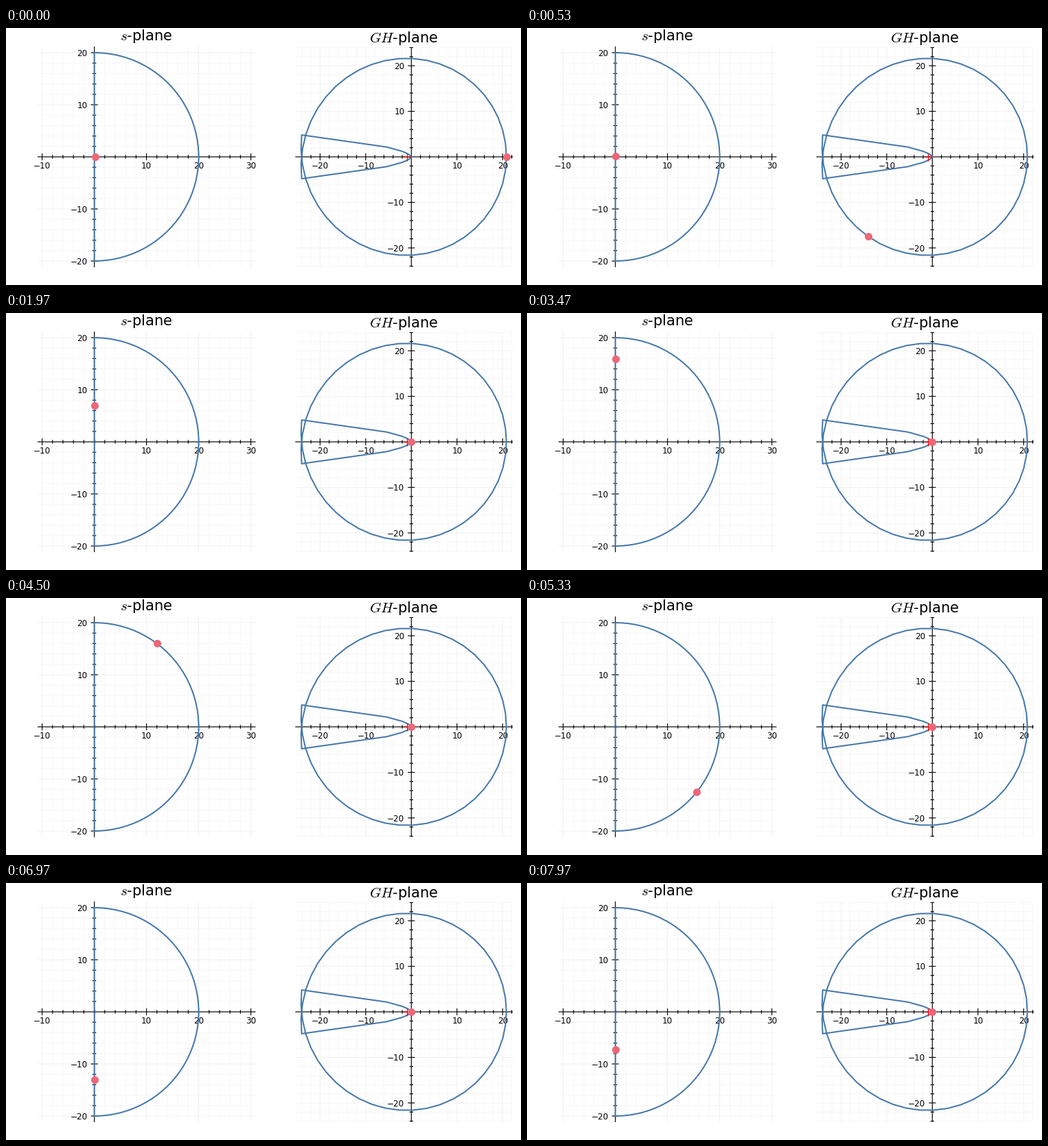
A matplotlib script that plays this animation: 750 px wide and 375 px high, repeating every 8000 ms.

```python
import numpy as np
import matplotlib.pyplot as plt
from matplotlib.animation import FuncAnimation
from matplotlib.collections import LineCollection

W, H, DPI = 750, 375, 100
PX = 72 / DPI  # points per pixel
BLUE, PINK = "#4477AA", "#EE6677"
LOOP_MS, TICK_MS = 8000, 20
POINTS_PER_S = 30
EPS, R = 0.2, 20

plt.rcParams["font.family"] = "DejaVu Sans"
plt.rcParams["mathtext.fontset"] = "cm"


def arc(radius, start, stop, n):
    return radius * np.exp(1j * np.radians(np.linspace(start, stop, n)))


def nyquist_path():
    """Contour around the right half plane, indented at the origin."""
    return np.concatenate([
        arc(EPS, 0, 90, 25),
        1j * np.linspace(EPS, R / 2, 50),
        1j * np.linspace(R / 2, R, 50),
        arc(R, 90, -90, 50),
        1j * np.linspace(-R, -R / 2, 50),
        1j * np.linspace(-R / 2, -EPS, 50),
        arc(EPS, -90, 0, 25),
    ])


def open_loop(s):
    return 1 / (s**2 * (s + 1))


class Plane:
    """Plot with axes through the origin, laid out in stage pixels."""

    def __init__(self, ax, origin, scale, box, title, title_pos):
        self.ax, self.origin, self.scale, self.box = ax, origin, scale, box
        self.draw_grid()
        self.draw_axes()
        ax.text(*title_pos, title, size=21 * PX, ha="center", va="baseline")

    def to_px(self, z):
        ox, oy = self.origin
        return ox + self.scale * np.real(z), oy - self.scale * np.imag(z)

    def ticks(self, axis):
        lo, hi = self.box[axis], self.box[axis + 2]
        for v in range(-40, 41, 2):
            p = self.origin[axis] + (v if axis == 0 else -v) * self.scale
            if lo <= p <= hi:
                yield v, p

    def lines(self, segs, color, width, z):
        self.ax.add_collection(LineCollection(
            segs, colors=color, linewidths=width * PX, zorder=z, snap=False))

    def draw_grid(self):
        x0, y0, x1, y1 = self.box
        for major, color in ((False, "#f7f7f7"), (True, "#efefef")):
            segs = [[(p, y0), (p, y1)] for v, p in self.ticks(0) if (v % 10 == 0) == major]
            segs += [[(x0, p), (x1, p)] for v, p in self.ticks(1) if (v % 10 == 0) == major]
            self.lines(segs, color, 0.9, 1)

    def draw_axes(self):
        x0, y0, x1, y1 = self.box
        ox, oy = self.origin
        segs = [[(x0, oy), (x1, oy)], [(ox, y0), (ox, y1)]]
        for axis in (0, 1):
            for v, p in self.ticks(axis):
                if v == 0:
                    continue
                d = 2.7 if v % 10 else 5
                if axis == 0:
                    segs.append([(p, oy - d), (p, oy + d)])
                else:
                    segs.append([(ox - d, p), (ox + d, p)])
                if v % 10 == 0:
                    self.label(axis, v, p)
        self.lines(segs, "black", 1.15, 2)

    def label(self, axis, v, p):
        ox, oy = self.origin
        text = str(v).replace("-", "\u2212")
        if axis == 0:
            place = dict(x=p, y=oy + 16.7, ha="center")
        else:
            place = dict(x=ox - 10, y=p + 4.6, ha="right")
        self.ax.text(s=text, size=12 * PX, va="baseline", zorder=2, **place)

    def curve(self, z):
        self.ax.plot(*self.to_px(z), color=BLUE, lw=2 * PX, zorder=3, snap=False)

    def marker(self, z, shape, size, **style):
        x, y = self.to_px(z)
        return self.ax.plot([x], [y], shape, ms=size * PX, snap=False, **style)[0]


fig = plt.figure(figsize=(W / DPI, H / DPI), dpi=DPI, facecolor="white")
ax = fig.add_axes([0, 0, 1, 1])
ax.set(xlim=(0, W), ylim=(H, 0))
ax.axis("off")

path = nyquist_path()
image = open_loop(path)

s_plane = Plane(ax, (128.6, 188), 7.6, (46, 27, 363.5, 349),
                "$s$-plane", (204.2, 18))
gh_plane = Plane(ax, (590.3, 188), 6.645, (421.3, 28, 738, 348.5),
                 "$GH$-plane", (579.6, 20.6))
s_plane.curve(path)
gh_plane.curve(image)
gh_plane.marker(-1, "+", 11, color="red", mew=1.2 * PX, zorder=4)

tracks = [(plane, z, plane.marker(z[0], "o", 11, color=PINK, mew=0, zorder=5))
          for plane, z in ((s_plane, path), (gh_plane, image))]


def update(n):
    # sample late in the tick so that steps are not shown behind time
    i = int((n + 0.7) * TICK_MS * POINTS_PER_S / 1000)
    for plane, z, dot in tracks:
        x, y = plane.to_px(z[i])
        dot.set_data([x], [y])
    return [dot for _, _, dot in tracks]


anim = FuncAnimation(fig, update, frames=LOOP_MS // TICK_MS, interval=TICK_MS,
                     repeat=True, repeat_delay=0, blit=False)
plt.show()
```
